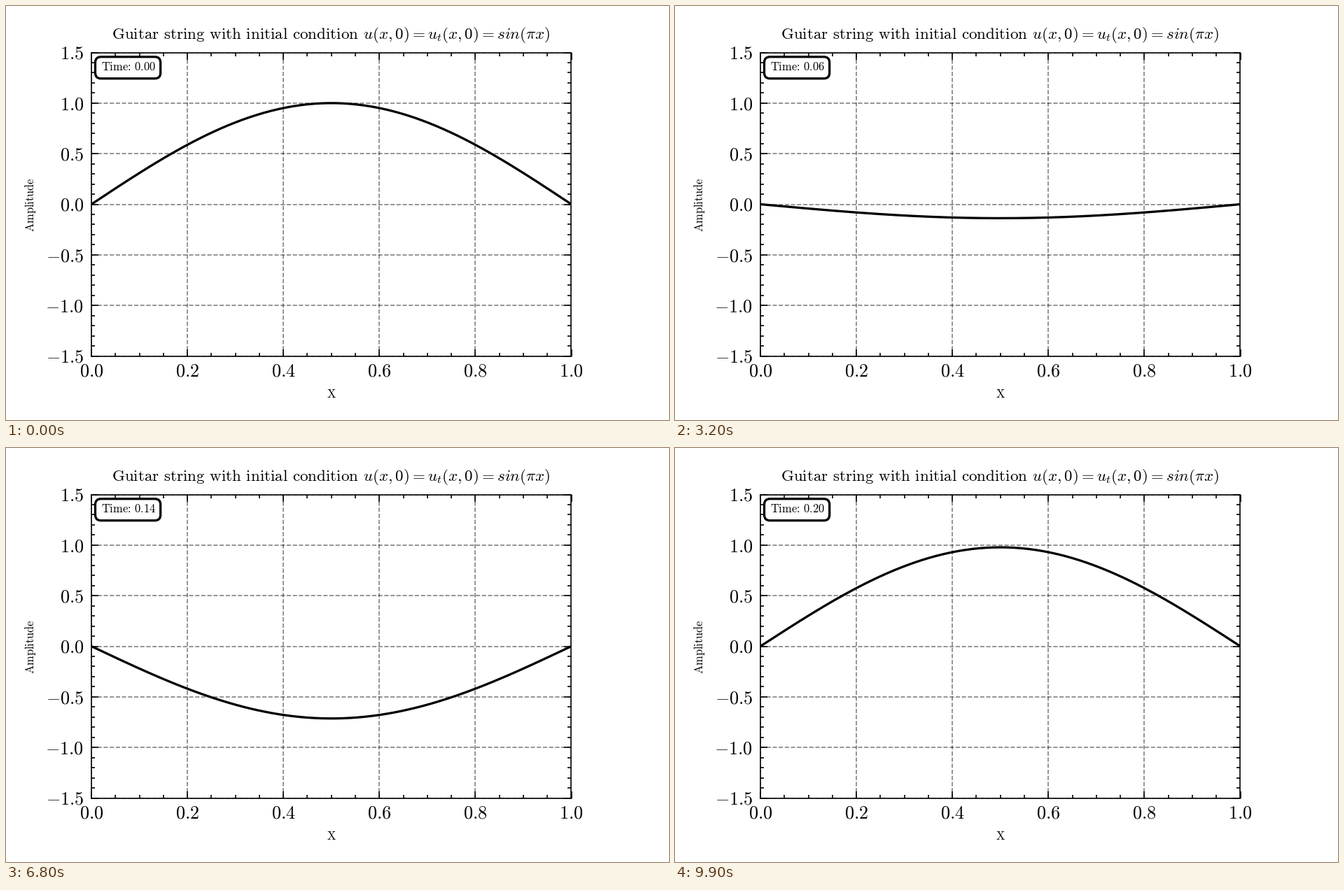
A matplotlib script for the animation above (10000 ms loop, 947 px wide and 592 px high).

```python
import numpy as np
import matplotlib.pyplot as plt
from matplotlib.animation import FuncAnimation
from matplotlib.patches import FancyBboxPatch
from matplotlib.ticker import AutoMinorLocator, MultipleLocator

plt.rcParams["mathtext.fontset"] = "cm"

W, H, DPI = 947, 592, 128
PT = 118.4 / DPI          # one design point in figure points
LEFT, RIGHT, TOP, BOTTOM = 122, 807.5, 66.5, 500.5
MID_X, MID_Y = (LEFT + RIGHT) / 2, (TOP + BOTTOM) / 2

FRAMES, INTERVAL, DT = 100, 100, 0.002
SPEED = 10

fig = plt.figure(figsize=(W / DPI, H / DPI), dpi=DPI, facecolor="white")

# Plot area
ax = fig.add_axes([LEFT / W, 1 - BOTTOM / H, (RIGHT - LEFT) / W, (BOTTOM - TOP) / H])
ax.set_xlim(0, 1)
ax.set_ylim(-1.5, 1.5)
ax.xaxis.set_major_locator(MultipleLocator(0.2))
ax.yaxis.set_major_locator(MultipleLocator(0.5))
ax.xaxis.set_minor_locator(AutoMinorLocator(4))
ax.yaxis.set_minor_locator(AutoMinorLocator(5))
for which, size in (("major", 6), ("minor", 3)):
    ax.tick_params(which=which, direction="in", top=True, right=True,
                   length=size * PT, width=PT,
                   labelleft=False, labelbottom=False)
for spine in ax.spines.values():
    spine.set_linewidth(PT)
ax.set_axisbelow(True)
ax.grid(color="black", alpha=0.5, linestyle="--", linewidth=PT)

x = np.linspace(0, 1, 201)
shape = np.sin(np.pi * x)
string, = ax.plot(x, shape, color="black", lw=2 * PT, zorder=3)

# Overlay in pixel coordinates for all lettering
page = fig.add_axes([0, 0, 1, 1])
page.set_xlim(0, W)
page.set_ylim(H, 0)
page.axis("off")


def label(px, py, text, size, ha="center", **kw):
    return page.text(px, py, f"${text}$", fontsize=size * PT,
                     ha=ha, va="baseline", **kw)


def clock(t):
    return rf"\text{{Time: {t:.2f}}}"


for v in np.arange(6) / 5:
    label(LEFT + v * (RIGHT - LEFT), 530, f"{v:.1f}", 16)
for v in np.arange(-3, 4) / 2:
    label(111.3, MID_Y - v * (BOTTOM - TOP) / 3 + 9.2, f"{v:.1f}", 16, ha="right")

label(MID_X, 46.8,
      r"\text{Guitar string with initial condition }u(x,0)=u_t(x,0)=sin(\pi x)", 14)
label(MID_X, 560.5, r"\text{X}", 10)
label(40.2, MID_Y + 0.5, r"\text{Amplitude}", 10, rotation=90,
      rotation_mode="anchor")

page.add_patch(FancyBboxPatch((135.7, 80.9), 76.8, 14.6,
                              boxstyle="round,pad=8.2,rounding_size=8.2",
                              fc="white", ec="black", lw=2 * PT))
timer = label(135.7, 92.3, clock(0), 10, ha="left")


def update(i):
    t = i * DT
    phase = SPEED * np.pi * t
    string.set_ydata((np.cos(phase) + np.sin(phase) / np.pi) * shape)
    timer.set_text(f"${clock(t)}$")
    return string, timer


anim = FuncAnimation(fig, update, frames=FRAMES, interval=INTERVAL,
                     repeat=True, repeat_delay=0)
plt.show()
```
